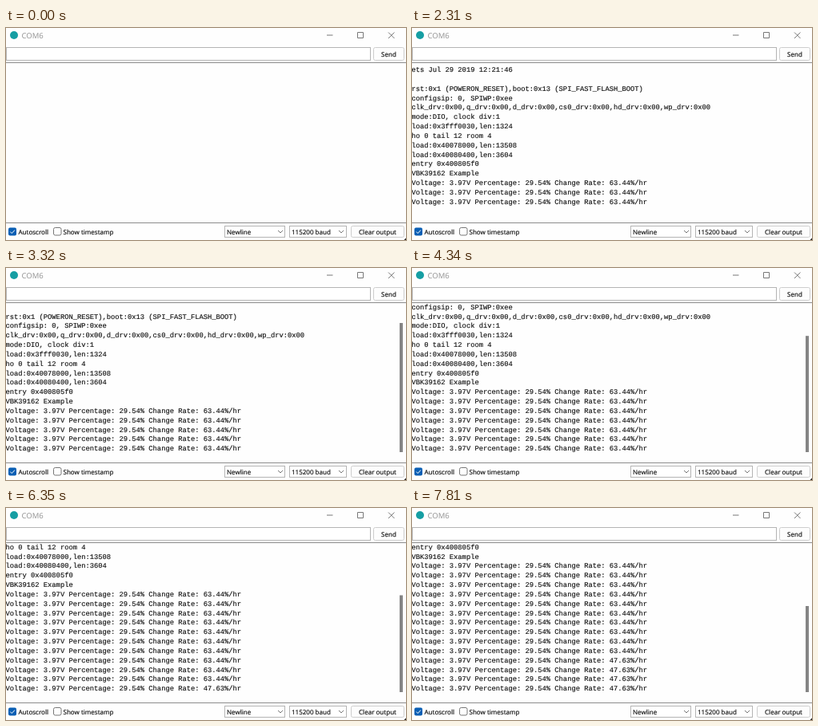
An HTML page that plays this animation: 500 by 266 pixels, repeating every 8000 ms.

```html
<!DOCTYPE html>
<html lang="en">
<head>
<meta charset="utf-8">
<title>Serial monitor</title>
<style>
  html, body { margin: 0; width: 100%; height: 100%; overflow: hidden; background: #fff; }
  svg { display: block; width: 500px; height: 266px; }
  text {
    font: 8px "Noto Sans", "Open Sans", sans-serif;
    fill: #111; stroke: #111; stroke-width: .15;
    text-rendering: geometricPrecision;
  }
  .title { font-size: 9.5px; fill: #999; stroke: none; }
  #log text { font: 8.78px "Liberation Mono", "Courier New", monospace; }
  .box { fill: #fff; stroke: #b4b4b4; }
  .button { fill: #fdfdfd; stroke: #cdcdcd; }
  .line { fill: none; stroke: #777; }
  .rule { fill: none; stroke: #8c8c8c; }
</style>
</head>
<body>
<svg viewBox="0 0 500 266">
  <clipPath id="pane"><rect y="44" width="488" height="200"/></clipPath>
  <rect width="500" height="266" fill="#fefefe"/>

  <circle cx="10" cy="9" r="5" fill="#169ea3"/>
  <text class="title" x="19.5" y="12.8">COM6</text>
  <path class="line" d="M401 9h7.5M439.5 5.5h7v7h-7zM478 5.5l7.5 7.5m0-7.5l-7.5 7.5"/>

  <rect class="box" x=".5" y="24.5" width="455" height="16"/>
  <rect class="button" x="459.5" y="24.5" width="38" height="16" rx="2"/>
  <text x="478.5" y="35.5" text-anchor="middle">Send</text>

  <path class="rule" d="M0 43.5H500M0 244.5H500"/>
  <g clip-path="url(#pane)"><g id="log"></g></g>
  <rect id="thumb" x="492" width="4" fill="#858585"/>

  <rect x="3" y="250.5" width="10" height="10" rx="2" fill="#0a5fb4"/>
  <path d="M5.3 255.6l2 2 3.6-4" fill="none" stroke="#fff"/>
  <text x="15.5" y="258.6">Autoscroll</text>
  <rect class="line" x="59.5" y="250.5" width="9.5" height="9.5" rx="2"/>
  <text x="71.5" y="258.6">Show timestamp</text>

  <rect class="box" x="273.5" y="248.5" width="75" height="14"/>
  <text x="276" y="258.6">Newline</text>
  <rect class="box" x="354.5" y="248.5" width="71" height="14"/>
  <text x="357" y="258.6">115200 baud</text>
  <path class="line" d="M340 254l3 3 3-3M416 254l3 3 3-3"/>
  <rect class="button" x="431.5" y="248.5" width="66" height="14" rx="2"/>
  <text x="464.5" y="258.6" text-anchor="middle">Clear output</text>
  <path d="M500 263.5v2.5h-2.5z" fill="#222"/>
</svg>
<script>
const LOOP = 8000, PITCH = 11.84, ROWS = 15;
const boot = [
  "ets Jul 29 2019 12:21:46",
  "",
  "rst:0x1 (POWERON_RESET),boot:0x13 (SPI_FAST_FLASH_BOOT)",
  "configsip: 0, SPIWP:0xee",
  "clk_drv:0x00,q_drv:0x00,d_drv:0x00,cs0_drv:0x00,hd_drv:0x00,wp_drv:0x00",
  "mode:DIO, clock div:1",
  "load:0x3fff0030,len:1324",
  "ho 0 tail 12 room 4",
  "load:0x40078000,len:13508",
  "load:0x40080400,len:3604",
  "entry 0x400805f0"
].map(text => ({ text, at: 1240 }));

const readingTimes = [1320, 1780, 2310, 2770, 3320, 3780, 4340, 4800, 5250, 5800, 6350, 6730, 7280, 7810];
const readings = readingTimes.map((at, i) => ({
  at,
  text: `Voltage: 3.97V Percentage: 29.54% Change Rate: ${i < 10 ? "63.44" : "47.63"}%/hr`
}));
const lines = [...boot, { text: "VBK39162 Example", at: 1320 }, ...readings];

const log = document.getElementById("log");
const thumb = document.getElementById("thumb");
lines.forEach((line, i) => {
  line.el = document.createElementNS("http://www.w3.org/2000/svg", "text");
  line.el.textContent = line.text;
  line.el.setAttribute("x", -0.5);
  line.el.setAttribute("y", 55 + i * PITCH);
  log.append(line.el);
});

function draw(t) {
  let count = 0;
  for (const { at, el } of lines) {
    const shown = t >= at;
    el.style.display = shown ? "" : "none";
    count += shown;
  }
  // Autoscroll keeps the newest line at the bottom of the pane.
  const over = count - ROWS;
  const scroll = over > 0 ? 3.3 + (over - 1) * PITCH : 0;
  log.setAttribute("transform", `translate(0 ${-scroll})`);

  const size = over > 0 ? 2916 / (count + 1) : 0;
  thumb.setAttribute("y", 231 - size);
  thumb.setAttribute("height", size);
}

const start = performance.now();
function tick() {
  draw((performance.now() - start) % LOOP);
  requestAnimationFrame(tick);
}
tick();
</script>
</body>
</html>
```
